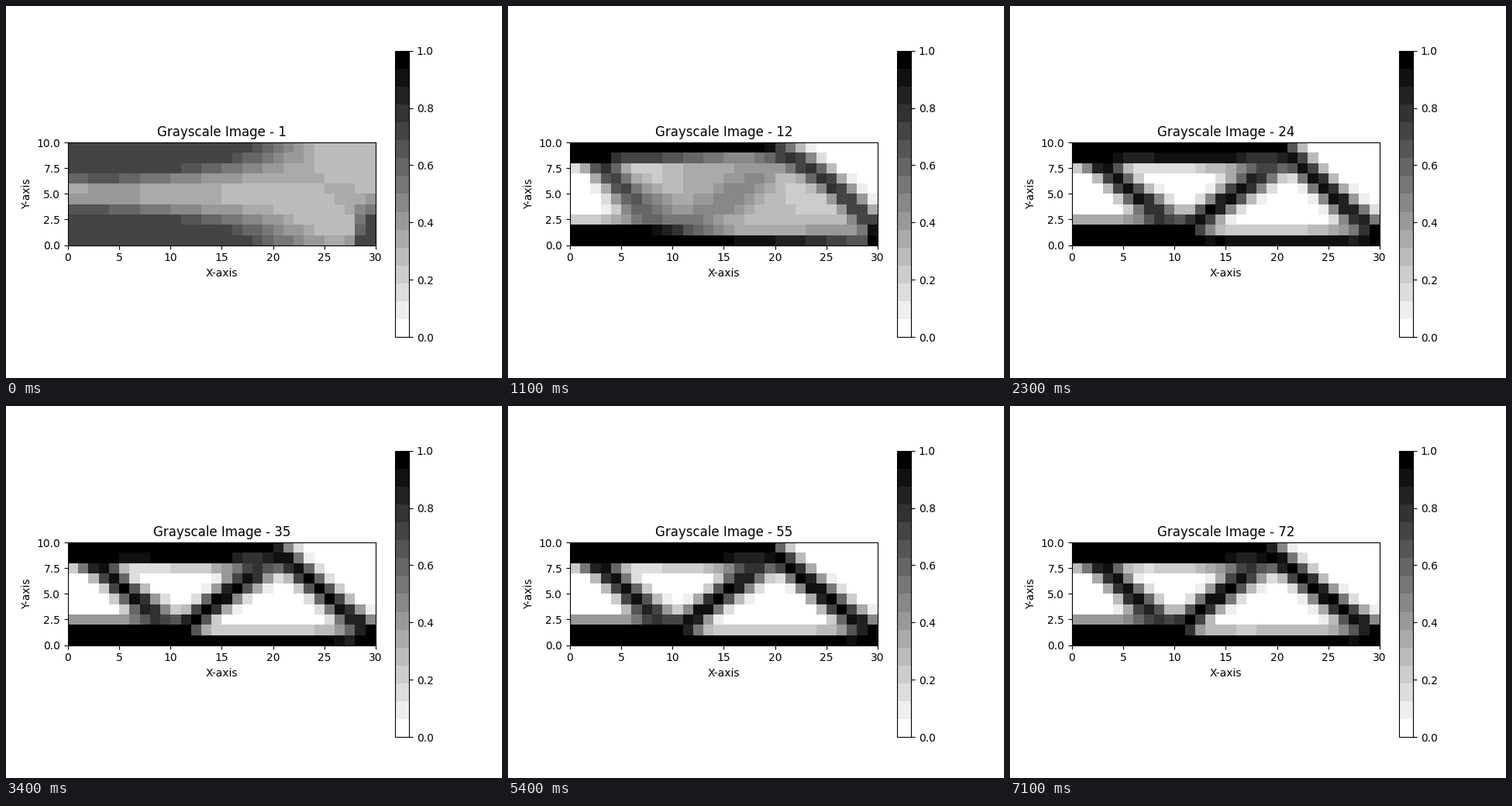
Write a matplotlib script that moves like this. It is 640 px wide and 480 px high and loops after 7.2 s.

```python
import numpy as np
import matplotlib.pyplot as plt
from matplotlib.animation import FuncAnimation

# Topology optimisation of a half MBB beam, one design per frame.
NX, NY = 30, 10
VOLUME, PENALTY, RADIUS = 0.5, 3.0, 1.5
MOVE, X_MIN, NU = 0.2, 0.001, 0.3
STEPS, INTERVAL = 72, 100


def element_stiffness():
    k = np.array([1/2 - NU/6, 1/8 + NU/8, -1/4 - NU/12, -1/8 + 3*NU/8,
                  -1/4 + NU/12, -1/8 - NU/8, NU/6, 1/8 - 3*NU/8])
    order = ["01234567", "10765432", "27056341", "36507214",
             "45670123", "54321076", "63412705", "72143650"]
    return k[[[int(c) for c in row] for row in order]] / (1 - NU**2)


def element_dofs(col, row):
    left = 2 * ((NY + 1) * col + row)
    right = left + 2 * (NY + 1)
    return np.stack([left + 2, left + 3, right + 2, right + 3,
                     right, right + 1, left, left + 1], axis=1)


# Elements are numbered down each column, starting at the top left.
cols, rows = (a.ravel() for a in np.meshgrid(np.arange(NX), np.arange(NY), indexing="ij"))
KE = element_stiffness()
DOFS = element_dofs(cols, rows)
N_DOFS = 2 * (NX + 1) * (NY + 1)
K_ROWS = np.repeat(DOFS, 8, axis=1)
K_COLS = np.tile(DOFS, (1, 8))

FIXED = np.append(np.arange(0, 2 * (NY + 1), 2), N_DOFS - 1)
FREE = np.setdiff1d(np.arange(N_DOFS), FIXED)

distance = np.hypot(cols[:, None] - cols, rows[:, None] - rows)
WEIGHTS = np.maximum(0, RADIUS - distance)
WEIGHT_SUMS = WEIGHTS.sum(axis=1)


def strain_energy(x):
    stiffness = np.zeros((N_DOFS, N_DOFS))
    np.add.at(stiffness, (K_ROWS, K_COLS), x[:, None]**PENALTY * KE.ravel())
    load = np.zeros(N_DOFS)
    load[1] = -1
    u = np.zeros(N_DOFS)
    u[FREE] = np.linalg.solve(stiffness[np.ix_(FREE, FREE)], load[FREE])
    ue = u[DOFS]
    return np.sum(ue @ KE * ue, axis=1)


def improve(x):
    gain = PENALTY * x**(PENALTY - 1) * strain_energy(x)
    gain = WEIGHTS @ (x * gain) / (WEIGHT_SUMS * x)
    low, high = 0.0, 1e5
    while high - low > 1e-4:
        mid = (low + high) / 2
        new = np.clip(x * np.sqrt(gain / mid), x - MOVE, x + MOVE)
        new = np.clip(new, X_MIN, 1)
        if new.mean() > VOLUME:
            low = mid
        else:
            high = mid
    return new


def design_history():
    x = np.full(NX * NY, VOLUME)
    history = []
    for _ in range(STEPS):
        x = improve(x)
        history.append(x.reshape(NX, NY).T)
    return history


designs = design_history()

fig, ax = plt.subplots(figsize=(6.4, 4.8), dpi=100)
image = ax.imshow(designs[0], cmap=plt.get_cmap("gray_r", 16), vmin=0, vmax=1,
                  extent=[0, NX, 0, NY], interpolation="nearest")
fig.colorbar(image, ax=ax)
ax.set_xlabel("X-axis")
ax.set_ylabel("Y-axis")
title = ax.set_title("Grayscale Image - 1")


def update(i):
    image.set_data(designs[i])
    title.set_text(f"Grayscale Image - {i + 1}")
    return image, title


anim = FuncAnimation(fig, update, frames=STEPS, interval=INTERVAL,
                     repeat=True, repeat_delay=0, blit=False)
plt.show()
```
